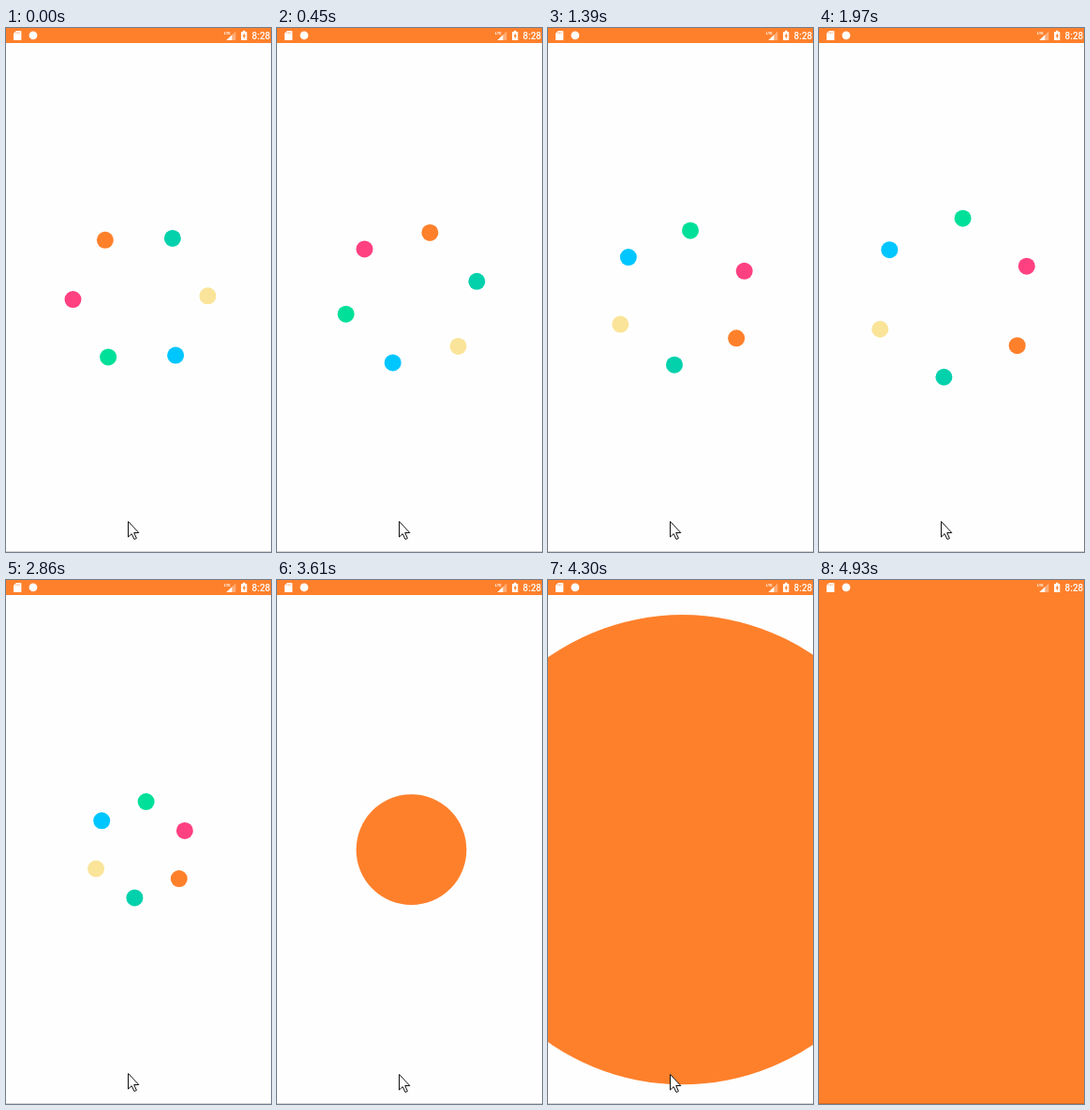
Recreate the animation shown at these times as an HTML page. Size 283 by 558 pixels, loop 5610 ms.

```html
<!DOCTYPE html>
<html lang="en">
<head>
<meta charset="utf-8">
<title>Splash</title>
<style>
  html, body { margin: 0; width: 100%; height: 100%; overflow: hidden; background: #fefefe; }
  svg { display: block; width: 283px; height: 558px; }
  text { font-family: Roboto, sans-serif; fill: #fff; }
</style>
</head>
<body>
<svg viewBox="0 0 283 558">
  <rect width="283" height="558" fill="#fefefe"/>
  <g id="dots"></g>
  <circle id="disc" cx="143.5" cy="287.2" fill="#ff802b"/>
  <rect y="557" width="283" height="1" fill="#000" opacity=".17"/>

  <rect width="283" height="16" fill="#ff802b"/>
  <g fill="#fff">
    <path d="M10.8 3H15.5Q16.4 3 16.4 3.9V12.2Q16.4 13.1 15.5 13.1H9Q8.1 13.1 8.1 12.2V5.7Z"/>
    <path d="M10.8 4.4v1.8M12.5 4.4v1.8M14.2 4.4v1.8" stroke="#ff802b" stroke-width=".8" opacity=".7"/>
    <circle cx="29" cy="7.8" r="4.4"/>
    <text x="232.8" y="7" font-size="4.2" font-weight="700" textLength="none">LTE</text>
    <path d="M245.3 3.4V13H235.4Z" opacity=".35"/>
    <path d="M241.3 7.2V13H235.4Z"/>
    <path d="M253 2.8h2.4v1.1h1.2q.7 0 .7.7v7.8q0 .7-.7.7h-4.8q-.7 0-.7-.7V4.6q0-.7.7-.7h1.2Z"/>
    <path d="M254.8 5.2l-2.2 3.9h1.3v2.6l2.2-4h-1.3Z" fill="#ff802b"/>
    <text x="262.6" y="12" font-size="10" font-weight="500">8:28</text>
  </g>

  <path id="cursor" d="M130.5 525.5V542L134.2 538.6L137 544.5L139.4 543.4L136.7 537.5H141.8Z"
        fill="#fff" stroke="#111" stroke-width="1"/>
</svg>
<script>
  const LOOP = 5610, CX = 143.5, CY = 287.2, RING = 72, DOT = 9;
  const COLORS = ['#ff802b', '#02d1ac', '#fae499', '#00c6ff', '#00e099', '#ff4081'];
  // Moments at which the picture advances by one even step of motion
  const TICKS = [0, 150, 310, 450, 570, 690, 840, 960, 1090, 1240, 1390, 1510, 1660,
    1820, 1970, 2120, 2270, 2430, 2550, 2700, 2860, 2980, 3130, 3250, 3370, 3490, 3610,
    3760, 3880, 4030, 4180, 4300, 4450, 4570, 4690, 4810, 4930];
  const SPIN_END = 10, MERGE_START = 10.19, MERGE_STEPS = 11.56;
  const GROW_START = 23, GROW_STEPS = 11, COVERED = 35, CURSOR_GONE = 36;

  const $ = id => document.getElementById(id);
  const clamp = v => Math.min(1, Math.max(0, v));

  const dots = COLORS.map(color => {
    const dot = document.createElementNS('http://www.w3.org/2000/svg', 'circle');
    dot.setAttribute('r', DOT);
    dot.setAttribute('fill', color);
    return $('dots').appendChild(dot);
  });

  function draw(step) {
    const turn = -121.5 + 15.83 * Math.min(step, SPIN_END);
    const u = clamp((step - MERGE_START) / MERGE_STEPS);
    const ring = RING * (1 + 3 * u * u - 4 * u ** 3); // reversed overshoot, tension 3
    dots.forEach((dot, i) => {
      const a = (turn + 60 * i) * Math.PI / 180;
      dot.setAttribute('cx', CX + ring * Math.cos(a));
      dot.setAttribute('cy', CY + ring * Math.sin(a));
    });

    const growing = step >= GROW_START;
    const g = clamp((step - GROW_START) / GROW_STEPS);
    const radius = step >= COVERED ? 320 : 8.5 + 146 * (1 - Math.cos(Math.PI * g));
    $('dots').style.display = growing ? 'none' : '';
    $('disc').setAttribute('r', growing ? radius : 0);

    $('cursor').setAttribute('transform', `translate(0 ${step >= 21 ? 1 : 0})`);
    $('cursor').style.display = step >= CURSOR_GONE ? 'none' : '';
  }

  const start = performance.now();
  function frame() {
    const t = (performance.now() - start) % LOOP;
    draw(TICKS.findLastIndex(tick => tick <= t));
    requestAnimationFrame(frame);
  }
  frame();
</script>
</body>
</html>
```
